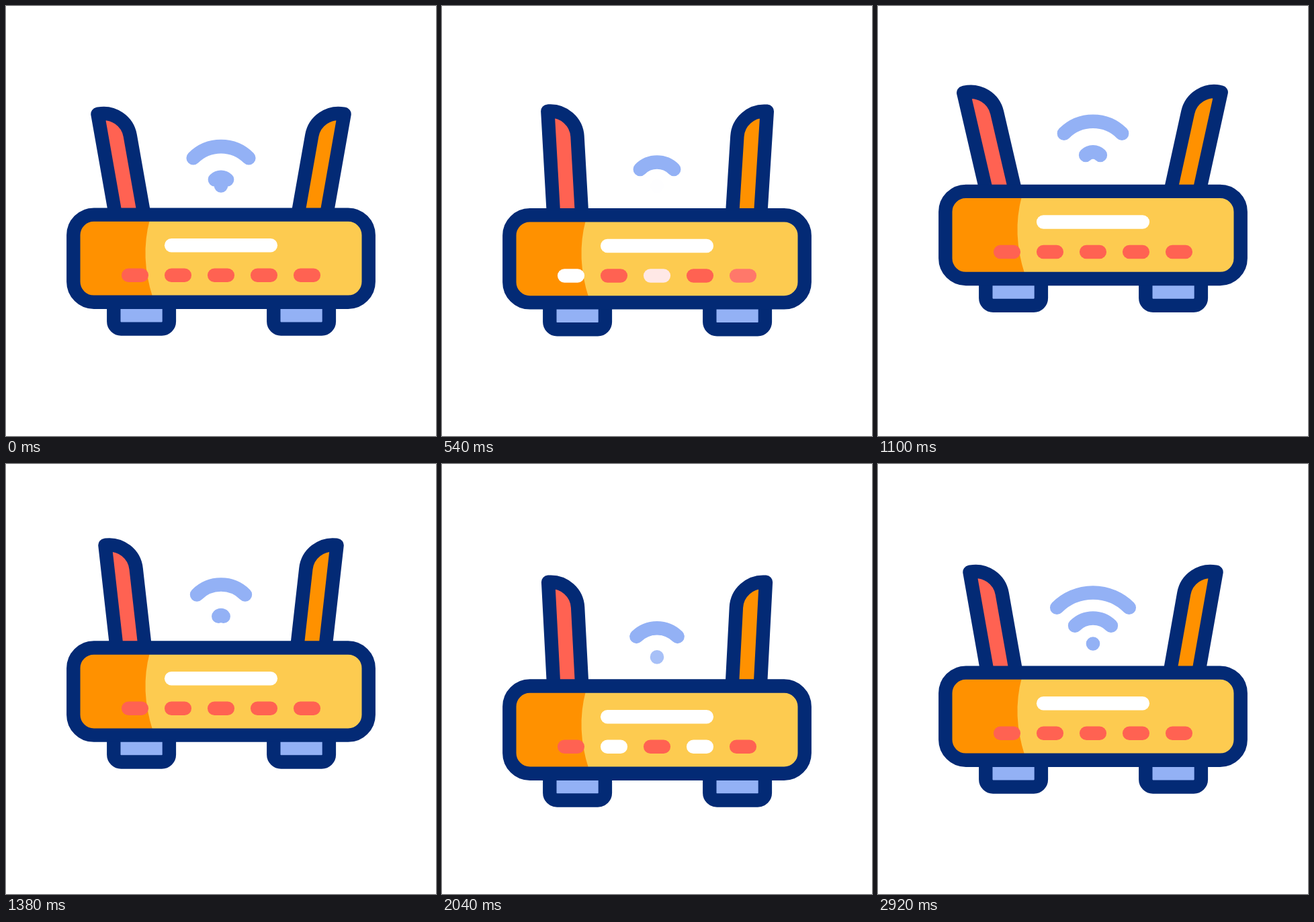
Animation, 640 px wide and 640 px high, one loop 3.2 s. Source, as an HTML page:

```html
<!DOCTYPE html>
<html lang="en">
<head>
<meta charset="utf-8">
<title>Router</title>
<style>
  html, body { margin: 0; width: 100%; height: 100%; overflow: hidden; background: #fff; }
  svg { display: block; width: 100%; height: 100%; }
  .line { stroke: #032a75; stroke-width: 20.4; stroke-linejoin: round; }
  .blue { fill: #93b1f5; }
  .bar { fill: none; stroke: #fff; stroke-width: 20.5; stroke-linecap: round; }
  .wave { fill: none; stroke: #93b1f5; stroke-width: 20.6; stroke-linecap: round; stroke-linejoin: round; }
</style>
</head>
<body>
<svg viewBox="0 0 640 640">
  <defs>
    <path id="mast" d="M-21 0V-180.5h1.5a40.5 40 0 0 1 40.5 40V0z"/>
    <path id="foot" d="M160.3 440V469.6a11 11 0 0 0 11 11H231.9a11 11 0 0 0 11-11V440z"/>
  </defs>
  <g id="router">
    <g id="waves"></g>
    <use id="left" href="#mast" class="line" fill="#ff6252"/>
    <use id="right" href="#mast" class="line" fill="#ff9100"/>
    <use href="#foot" class="line blue"/>
    <use href="#foot" class="line blue" x="238"/>
    <rect x="100.3" y="310.6" width="439.4" height="130.2" rx="30.5" fill="#fdcb50"/>
    <path d="M214 318Q199 374 218.5 434H131a30 30 0 0 1-30-30V341a30 30 0 0 1 30-30z" fill="#ff9100"/>
    <rect x="100.3" y="310.6" width="439.4" height="130.2" rx="30.5" class="line" fill="none"/>
    <path class="bar" d="M246.2 356.3H393.8"/>
    <g id="leds"></g>
  </g>
</svg>
<script>
const LOOP = 3200;
const NS = "http://www.w3.org/2000/svg";
const $ = id => document.getElementById(id);
const clamp = v => Math.min(1, Math.max(0, v));

function add(parent, cls) {
  const el = document.createElementNS(NS, "path");
  el.setAttribute("class", cls);
  return parent.appendChild(el);
}

function bezier(x1, x2) {
  return u => {
    let lo = 0, hi = 1, s = 0.5;
    for (let i = 0; i < 24; i++) {
      s = (lo + hi) / 2;
      const r = 1 - s;
      const x = 3 * r * r * s * x1 + 3 * r * s * s * x2 + s * s * s;
      if (x < u) lo = s; else hi = s;
    }
    return s * s * (3 - 2 * s);
  };
}

const smooth = bezier(0.4, 0.6);
const leap = bezier(0, 0.42);
const fall = bezier(0.98, 0.88);

// Steps: [time, value, easing into this step]
const hop = [[200, 0], [340, 25], [1300, -37.4, leap], [2080, 25, fall], [2330, -14.4], [2740, 0]];
const settle = [[1360, 6.4], [1760, 10.4], [2040, 3]];
const leftTilt = [[200, 10], [560, 3.2], [1020, 14], ...settle, [2345, 16.6], [2630, 7.5], [2920, 10]];
const rightTilt = [[200, 10], [500, 3.2], [860, 17.7], ...settle, [2355, 15.9], [2630, 7.5], [2920, 10]];

function at(steps, t) {
  if (t <= steps[0][0]) return steps[0][1];
  for (let i = 1; i < steps.length; i++) {
    const [t0, v0] = steps[i - 1];
    const [t1, v1, ease = smooth] = steps[i];
    if (t < t1) return v0 + (v1 - v0) * ease((t - t0) / (t1 - t0));
  }
  return steps[steps.length - 1][1];
}

// Each wave grows from a dot (0) to the small arc (1) and the big arc (2).
const GAP = 360, GROW = 300;
const waves = [];
for (let k = -2; k <= 6; k++) {
  waves.push({ k, start: 260 + GAP * k, stop: k < 4 ? 2 : 6 - k, el: add($("waves"), "wave") });
}

function drawWave({ k, start, stop, el }, t) {
  const raw = (t - start) / GROW;
  const size = Math.min(stop, Math.max(0, raw));
  const shown = k <= 0 ? 1 : clamp((t - start + 80) / 75);
  let gone = 0;
  if (k === -2) gone = clamp((t - 200) / 70);
  else if (k < 4) gone = clamp((raw - 1.84) / 0.21);
  const r = Math.max(0.01, 38 * size);
  const h = r * Math.SQRT1_2;
  const y = 267.5 - h;
  el.setAttribute("d", `M${320 - h} ${y}A${r} ${r} 0 0 1 ${320 + h} ${y}`);
  el.setAttribute("opacity", shown * (1 - gone));
}

const leds = [510, 1980, 630, 2100, 750].map((peak, i) => {
  const el = add($("leds"), "bar");
  el.setAttribute("d", `M${182.2 + 64 * i} 400.8h19.6`);
  return { peak, el };
});

function drawLed({ peak, el }, t) {
  const w = clamp((232 - Math.abs(t - peak)) / 167);
  const mix = c => Math.round(c + (255 - c) * w);
  el.style.stroke = `rgb(255,${mix(98)},${mix(82)})`;
}

function draw(t) {
  $("router").setAttribute("transform", `translate(0 ${at(hop, t)})`);
  $("left").setAttribute("transform", `translate(188.5 335) rotate(${-at(leftTilt, t)})`);
  $("right").setAttribute("transform", `translate(451.5 335) scale(-1 1) rotate(${-at(rightTilt, t)})`);
  waves.forEach(w => drawWave(w, t));
  leds.forEach(l => drawLed(l, t));
}

const begin = performance.now();
function tick() {
  draw((performance.now() - begin) % LOOP);
  requestAnimationFrame(tick);
}
tick();
</script>
</body>
</html>
```
